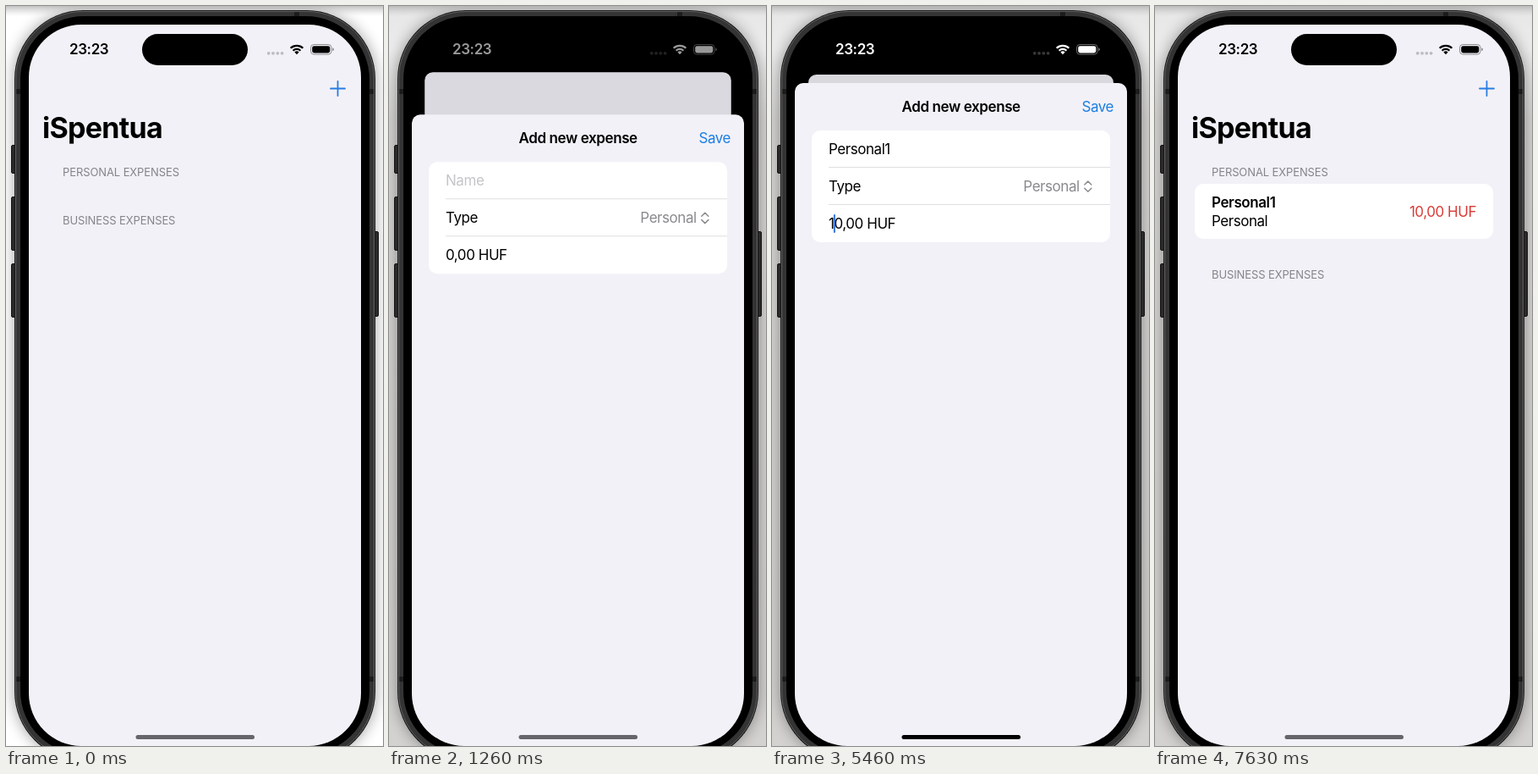
These frames come from a looping animation (446 by 874 pixels, 8000 ms). An HTML page:

```html
<!DOCTYPE html>
<html lang="en">
<head>
<meta charset="utf-8">
<title>Expense list</title>
<style>
  html, body { margin: 0; width: 100%; height: 100%; overflow: hidden; background: #fff; }
  svg { display: block; width: 100vw; height: 100vh; }
  text { font-family: Inter, "Liberation Sans", sans-serif; font-size: 17px; letter-spacing: -.45px; white-space: pre; }
  .semi { font-weight: 600; letter-spacing: -.4px; }
  .title { font-size: 34px; font-weight: 700; letter-spacing: -.7px; }
  .head { font-size: 13px; letter-spacing: -.1px; fill: #858489; }
  .gray { fill: #8a8a8e; }
  .end { text-anchor: end; }
  .mid { text-anchor: middle; }
  .line { fill: none; stroke: #dfdfe2; }
</style>
</head>
<body>
<svg viewBox="0 0 446 874" preserveAspectRatio="none">
  <defs>
    <clipPath id="screen"><rect x="27" y="22" width="393" height="852" rx="62"/></clipPath>
    <filter id="blur" x="-20%" y="-20%" width="140%" height="140%"><feGaussianBlur stdDeviation="9"/></filter>
    <linearGradient id="wall" x2="0" y2="1">
      <stop offset="0" stop-color="#e6e6e6"/><stop offset=".06" stop-color="#ececec"/>
      <stop offset=".15" stop-color="#d6d5d4"/><stop offset="1" stop-color="#d4d2d0"/>
    </linearGradient>
    <linearGradient id="top" x2="0" y2="1">
      <stop offset="0" stop-color="#a8a8a8"/><stop offset="1" stop-color="#c8c8c8" stop-opacity="0"/>
    </linearGradient>
  </defs>

  <rect width="446" height="874" fill="#fff"/>
  <rect id="backdrop" width="446" height="874" fill="url(#wall)"/>
  <rect x="10" y="6" width="427" height="884" rx="80" opacity=".38" filter="url(#blur)"/>
  <rect width="446" height="12" fill="url(#top)" opacity=".7"/>

  <g fill="#2b2b2b" stroke="#111">
    <rect x="6.5" y="164.5" width="6" height="33" rx="1.5"/>
    <rect x="6.5" y="225.5" width="6" height="63" rx="1.5"/>
    <rect x="6.5" y="304.5" width="6" height="63" rx="1.5"/>
    <rect x="434.5" y="266.5" width="6" height="100" rx="1.5"/>
  </g>
  <rect x="10" y="5" width="427" height="886" rx="81" fill="#151515"/>
  <rect x="11.5" y="6.5" width="424" height="883" rx="79.5" fill="#343434" stroke="#626262"/>
  <g fill="#1c1c1c">
    <rect x="12" y="98" width="5" height="6"/><rect x="430" y="98" width="5" height="6"/>
    <rect x="12" y="792" width="5" height="6"/><rect x="430" y="792" width="5" height="6"/>
    <rect x="341" y="7" width="6" height="5"/>
  </g>
  <rect x="17" y="12" width="413" height="872" rx="75"/>

  <g clip-path="url(#screen)">
    <rect x="27" y="22" width="393" height="852"/>

    <!-- list screen, in its own coordinates -->
    <g id="card">
      <rect width="393" height="852" rx="10.5" fill="#f2f1f7"/>
      <path id="plus" d="M357 75.5h17M365.5 67v17" fill="none" stroke-width="1.8" stroke-linecap="round"/>
      <text class="title" x="16" y="134">iSpentua</text>
      <text class="head" x="40" y="179">PERSONAL EXPENSES</text>
      <g id="row">
        <rect x="20" y="188" width="353" height="65" rx="10" fill="#fff"/>
        <text class="semi" x="40" y="216">Personal1</text>
        <text x="40" y="238">Personal</text>
        <text class="end" x="353" y="227" fill="#d93a36">10,00 HUF</text>
      </g>
      <text class="head" id="business" x="40">BUSINESS EXPENSES</text>
      <rect id="dim" width="393" height="852" rx="10.5"/>
    </g>

    <rect x="161" y="33" width="125" height="37" rx="18.5"/>
    <text class="semi" id="clock" x="75" y="57">23:23</text>
    <g id="icons">
      <g opacity=".22">
        <circle cx="310.7" cy="55.8" r="1.9"/><circle cx="316" cy="55.8" r="1.9"/>
        <circle cx="321.3" cy="55.8" r="1.9"/><circle cx="326.6" cy="55.8" r="1.9"/>
      </g>
      <path d="M344 57.3l-2.6-2.7a3.7 3.7 0 0 1 5.2 0z"/>
      <g fill="none" stroke="currentColor" stroke-width="2.3">
        <path d="M336.7 49.8a10.4 10.4 0 0 1 14.6 0"/>
        <path d="M339.6 52.8a6.2 6.2 0 0 1 8.8 0"/>
      </g>
      <rect x="360.5" y="45.5" width="24.5" height="11.6" rx="3.7" fill="none" stroke="currentColor" opacity=".42"/>
      <rect x="362.2" y="47.2" width="21.1" height="8.2" rx="2.3"/>
      <path d="M386.3 49.3q1.6.6 1.6 2t-1.6 2z" opacity=".45"/>
    </g>

    <!-- entry sheet, origin at its top left corner -->
    <g id="sheet">
      <rect width="393" height="900" rx="10" fill="#f2f1f7"/>
      <text class="semi mid" x="196.7" y="34">Add new expense</text>
      <text class="end" id="save" x="377" y="34" fill="#1b7ee2">Save</text>
      <rect x="20" y="56" width="353" height="132" rx="10" fill="#fff"/>
      <path class="line" d="M40 99.5h333M40 143.5h333"/>
      <text id="name" x="40" y="84"></text>
      <text x="40" y="128">Type</text>
      <text class="gray end" x="336.7" y="128">Personal</text>
      <path d="M342.8 120l4-4 4 4M342.8 124.300l4 4 4-4" fill="none" stroke="#8a8a8e" stroke-width="1.5" stroke-linecap="round" stroke-linejoin="round"/>
      <text id="amount" x="40" y="172"></text>
      <rect id="nameCaret" y="67" width="2" height="22" rx="1" fill="#2f74dc"/>
      <rect id="amountCaret" y="155" width="2" height="22" rx="1" fill="#2f74dc"/>
    </g>

    <rect id="home" x="153.500" y="861" width="140.500" height="5" rx="2.500"/>
  </g>
</svg>

<script>
const LOOP = 8000, STEP = 70;
const OPEN = 997, CLOSE = 7043, SPRING = 18.26;
const WORD = 'Personal1';
const KEYS = [2520, 2730, 2800, 2940, 3010, 3150, 3220, 3360, 3570];
const DIGIT = 5460, SUBMIT = 6930;

const el = Object.fromEntries([...document.querySelectorAll('[id]')].map(e => [e.id, e]));
const set = (e, attrs) => { for (const k in attrs) e.setAttribute(k, attrs[k]); };
const ramp = (t, a, b) => Math.min(1, Math.max(0, (t - a) / (b - a)));
const mix = (a, b, k) => `rgb(${a.map((v, i) => Math.round(v + (b[i] - v) * k))})`;
const gray = k => mix([0, 0, 0], [255, 255, 255], k);

// Critically damped spring from 0 to 1
function spring(ms) {
  const x = SPRING * Math.max(0, ms) / 1000;
  return 1 - (1 + x) * Math.exp(-x);
}

function caret(bar, text, count, opacity) {
  const advance = count ? text.getSubStringLength(0, count) : 0;
  set(bar, { x: 40 + advance - (count ? .6 : 0), opacity });
}

function draw(time) {
  const t = Math.floor(time / STEP) * STEP;
  const p = spring(t - OPEN) - spring(t - CLOSE);
  const scale = 1 - .0814 * p;

  set(el.backdrop, { opacity: t >= 840 ? 1 : 0 });
  set(el.card, { transform: `translate(${223.5 - 196.5 * scale} ${22 + 59 * p}) scale(${scale})` });
  set(el.dim, { opacity: .105 * p });
  set(el.plus, { stroke: mix([38, 125, 226], [168, 168, 178], Math.min(1, p * 1.15)) });
  set(el.sheet, { transform: `translate(27 ${874 - 783 * p})` });

  const saved = t >= SUBMIT;
  set(el.row, { opacity: saved ? 1 : 0 });
  set(el.business, { y: saved ? 300 : 235.5 });
  set(el.save, { opacity: saved ? .3 + .7 * ramp(t, 7070, 7400) : 1 });

  const lit = ramp(t, 1050, 1400);
  const iconTone = gray(t >= 7070 ? 0 : lit);
  set(el.clock, { fill: gray(lit - ramp(t, 7070, 7420)) });
  set(el.icons, { fill: iconTone, color: iconTone });
  set(el.home, { fill: t >= 4060 && t < SUBMIT ? '#000' : '#66656a' });

  const typed = KEYS.filter(k => t >= k).length;
  el.name.textContent = typed ? WORD.slice(0, typed) : 'Name';
  set(el.name, { fill: typed ? '#000' : '#c5c5c8' });
  el.amount.textContent = t >= DIGIT ? '10,00 HUF' : '0,00 HUF';
  caret(el.nameCaret, el.name, typed, t < 1890 ? 0 : 1 - ramp(t, 4550, 4690));
  caret(el.amountCaret, el.amount, t >= DIGIT ? 1 : 0, ramp(t, 4690, 4830) - ramp(t, 6510, 6650));
}

const start = performance.now();
function tick() {
  draw((performance.now() - start) % LOOP);
  requestAnimationFrame(tick);
}
tick();
</script>
</body>
</html>
```
